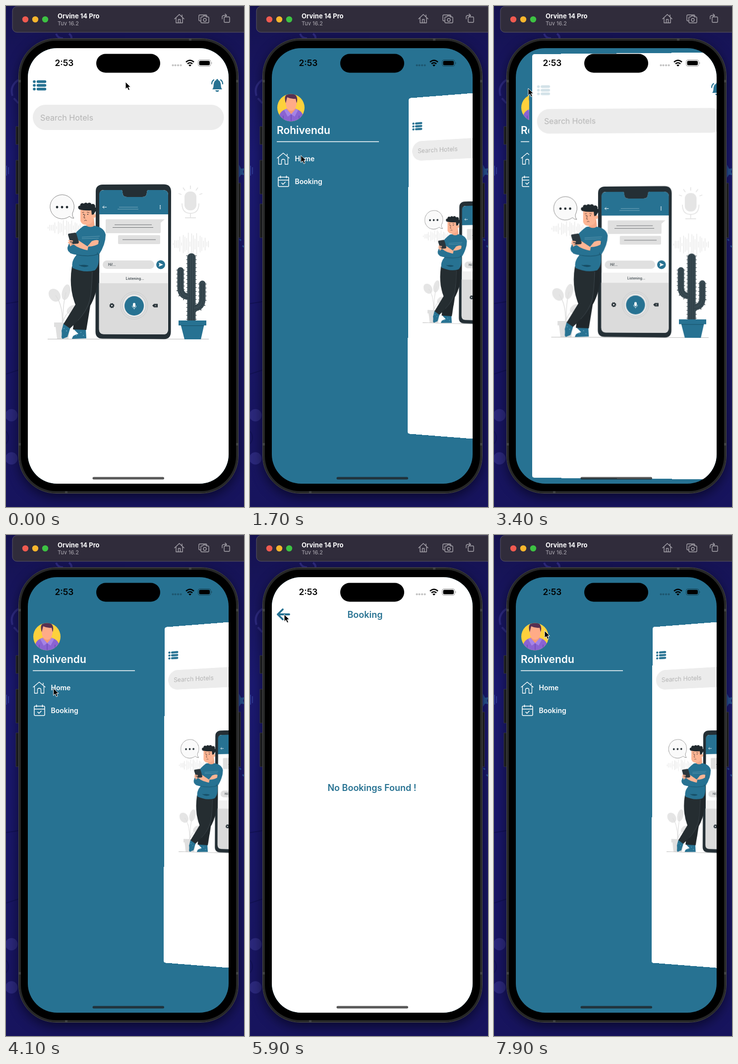
Animation, 480 px wide and 1010 px high, one loop 8000 ms. Source, as an HTML page:

```html
<!DOCTYPE html>
<html lang="en">
<head>
<meta charset="utf-8">
<title>Drawer menu</title>
<style>
html, body { margin: 0; width: 100%; height: 100%; overflow: hidden; background: #18155f; }
#stage { position: relative; width: 480px; height: 1010px; overflow: hidden; font-family: Inter, "Open Sans", sans-serif; }
#stage > svg { position: absolute; left: 0; top: 0; }
#screen { position: absolute; left: 44px; top: 85px; width: 405px; height: 878px; border-radius: 59px; overflow: hidden; background: #277292; }
#screen svg { position: absolute; left: 0; top: 0; display: block; }
#page { position: absolute; width: 405px; height: 878px; background: #fff; border-radius: 5px; overflow: hidden; transform-origin: 0 50%; }
#phone { position: absolute; left: 25px; top: 65px; width: 444px; height: 918px; box-sizing: border-box; border: 1.5px solid #4b4b4b; border-radius: 76px; background: #000; box-shadow: inset 0 0 0 4px #262727, 0 8px 22px rgba(0,0,10,.55); }
text { white-space: pre; }
</style>
</head>
<body>
<div id="stage">
  <svg width="480" height="1010">
    <defs><linearGradient id="night" x2="0" y2="1">
      <stop stop-color="#15124f"/><stop offset=".3" stop-color="#1b1970"/><stop offset="1" stop-color="#17145d"/>
    </linearGradient></defs>
    <rect width="480" height="1010" fill="url(#night)"/>
    <g fill="none" stroke="#35318a" stroke-width="4" opacity=".75">
      <path d="M25 149Q7 161 13 181M16 186l9 10M101 56q4 10 14 9M127 56q6 4 5 10"/>
      <path d="M0 857q10 13 0 26M0 600l25-4M0 742l25-8" stroke-width="2" stroke="#111050"/>
    </g>
    <g fill="#302d82" opacity=".8"><circle cx="11" cy="825" r="12.5"/><circle cx="11" cy="912" r="12.5"/></g>
    <path d="M1 322v20M5 325v14" stroke="#2d3790" stroke-width="2"/>
    <path d="M470 320l4 8 7-1-3 7 3 7-7-1-4 6z" fill="#285494"/>
    <path d="M471 470l3 3M477 483l3 3" stroke="#28509a" stroke-width="3"/>
    <g fill="#222324" stroke="#4a4a4a" stroke-width=".8">
      <path d="M20 243h6v36h-6zM20 311h6v68h-6zM20 399h6v68h-6zM467 357h6v110h-6z"/>
    </g>
    <rect x="13" y="1" width="480" height="52" rx="9" fill="#302c3b" stroke="#5b5663"/>
    <circle cx="39" cy="27" r="6.2" fill="#ef5a50"/><circle cx="59" cy="27" r="6.2" fill="#f8b62d"/><circle cx="79" cy="27" r="6.2" fill="#3dc243"/>
    <text x="104" y="25" font-size="13" font-weight="700" fill="#fff">Orvine 14 Pro</text>
    <text x="104" y="39" font-size="11" fill="#aeabb3">Tuv 16.2</text>
    <g fill="none" stroke="#a5a2aa" stroke-width="1.4" stroke-linejoin="round" stroke-linecap="round">
      <path d="M340 26l9.500-9 9.500 9M343 24v10h13V24M347.500 34v-7h4v7M355 18v4"/>
      <rect x="389" y="18" width="16" height="12" rx="2"/>
      <path d="M395 22h2l1-2h5l1 2h3q2 0 2 2v8q0 2-2 2h-12q-2 0-2-2v-8q0-2 2-2z" fill="#302c3b"/><circle cx="401" cy="28" r="3"/>
      <rect x="440" y="22" width="11" height="11" rx="1.500"/><path d="M436 26v-4q0-3 4-3h5M442 16l3 3-3 3"/>
    </g>
  </svg>

  <div id="phone"></div>
  <svg width="480" height="1010" fill="#515253">
    <path d="M25 149h5v5h-5zM25 881h5v5h-5zM464 149h5v5h-5zM464 881h5v5h-5zM369 66h5v4h-5zM119 978h5v4h-5z" opacity=".6"/>
  </svg>

  <div id="screen">
    <svg id="drawer" width="405" height="878" viewBox="44 85 405 878">
      <clipPath id="round"><circle cx="82.500" cy="205" r="27.500"/></clipPath>
      <circle cx="82.500" cy="205" r="27.500" fill="#fdd13c"/>
      <g clip-path="url(#round)">
        <path d="M57 235q0-24 16-27l10-3 10 3q16 3 16 27z" fill="#8a63d2"/>
        <path d="M67 235v-14M99 235v-14M83 217v18" stroke="#6f4bb8" stroke-width="1.500"/>
        <path d="M73 207l5-2h10l5 2-9 12z" fill="#f59a72"/>
        <path d="M72 190q0-12 11-12t11 12v7q-2 14-11 14t-11-14z" fill="#ffab87"/>
        <path d="M72 196q-5-18 6-18 9-5 15 3 4 5 1 15l-2-9q-9 1-17-3z" fill="#573052"/>
        <path d="M73 207l10 11-7 5-7-13zM93 207l-10 11 7 5 7-13z" fill="#a583e5"/>
      </g>
      <text x="54" y="258" font-size="21" font-weight="600" fill="#fff">Rohivendu</text>
      <path d="M54 273.500H260" stroke="#fff" stroke-width="1.300"/>
      <g fill="#fff" font-size="14" font-weight="600">
        <g id="homeItem">
          <path d="M54.500 307l12.500-10.500L79.500 307M57.500 305v14h6v-7q0-3 3.500-3t3.500 3v7h6v-14M75 298v4" fill="none" stroke="#fff" stroke-width="1.300" stroke-linejoin="round"/>
          <text x="90.500" y="312.500">Home</text>
        </g>
        <g id="bookingItem">
          <path d="M59 345h17q2 0 2 2v15q0 2-2 2H59q-2 0-2-2v-15q0-2 2-2zM57 351h21M61.500 342v5M73.500 342v5M63.500 356.500l3 3 5-5" fill="none" stroke="#fff" stroke-width="1.500"/>
          <text x="90.500" y="358.500">Booking</text>
        </g>
      </g>
    </svg>

    <div id="page">
      <svg id="home" width="405" height="878" viewBox="44 85 405 878">
        <g id="menuIcon" stroke="#277292" stroke-width="5.600" stroke-linecap="round">
          <path d="M57 152.500h.1M64.500 152.500h14M57 160h.1M64.500 160h14M57 167.500h.1M64.500 167.500h14"/>
        </g>
        <path d="M416 168q2-2 2.500-6 0-11 5.500-12.500 0-2.500 2-2.500t2 2.500q5.500 1.500 5.500 12.500.5 4 2.500 6zM422 170h8q-1 3-4 3t-4-3z" fill="#277292"/>
        <path d="M419 149q-4 3-4 8M433 149q4 3 4 8" fill="none" stroke="#277292" stroke-width="2.200" stroke-linecap="round"/>
        <rect x="54" y="199" width="385.500" height="51" rx="25.500" fill="#ececec"/>
        <text x="69" y="230.500" font-size="16.200" fill="#b4b4b4">Search Hotels</text>

        <path id="waves" stroke="#dedede" stroke-width="1"/>
        <path d="M84 671.500H409" stroke="#a9a9a9" stroke-width=".8"/>
        <g fill="#e5e5e5">
          <rect x="360" y="374" width="24" height="38" rx="11"/>
          <path d="M355 398q0 20 17 20t17-20M372 418v9M361 427h22M372 362v7M357 366l4 6M387 366l-4 6M348 378l6 2M396 378l-6 2" fill="none" stroke="#e5e5e5" stroke-width="1.800"/>
          <ellipse cx="98" cy="583" rx="11" ry="14" transform="rotate(-35 98 583)"/>
          <ellipse cx="121" cy="577" rx="8" ry="16" transform="rotate(14 121 577)"/>
          <ellipse cx="132" cy="612" rx="7" ry="11" transform="rotate(50 132 612)"/>
          <path d="M113 642Q116 605 100 583M115 640Q114 604 121 577M115 636Q119 622 132 612" fill="none" stroke="#dedede" stroke-width="1.500"/>
          <path d="M97 638h35v9h-3l-3 24h-23l-3-24h-3z" fill="#dfdfdf"/>
        </g>
        <path d="M136 413a24.300 24.300 0 1 0-8 11q3 4 9 4-4-4-3-10z" fill="#fafafa" stroke="#555" stroke-width=".7"/>
        <path d="M103 405.500h.1M113 405.500h.1M123 405.500h.1" stroke="#222b30" stroke-width="4.800" stroke-linecap="round"/>

        <path d="M195 360l123-.500q15 0 15 15l-.500 282q0 15-14 15l-124-1q-14 0-14-14l.500-283q0-13 14-13.500z" fill="#242f35"/>
        <path d="M198 371h34q3 0 3 5 0 9 9 9h31q9 0 9-9 0-5 4-5h29q10 0 10 10v271q0 10-10 10l-120-.500q-9 0-9-10l.500-271q0-10 9.500-9.500z" fill="#fff"/>
        <path d="M198 371h34q3 0 3 5 0 9 9 9h31q9 0 9-9 0-5 4-5h29q10 0 10 10v39H188v-39q0-10 10-10z" fill="#277292"/>
        <path d="M203 405.500h-8l3-3m-3 3l3 3" fill="none" stroke="#fff" stroke-width="1"/>
        <path d="M228 405.500h38M225 409.500h42" stroke="#8bb5c6" stroke-width=".8"/>
        <path d="M311 402.500h.1M311 405.500h.1M311 408.500h.1" stroke="#fff" stroke-width="2" stroke-linecap="round"/>
        <path d="M203 430h117l-8 7v19q0 2-2 2H203q-2 0-2-2v-24q0-2 2-2z" fill="#e0e0e0"/>
        <rect x="226" y="462" width="85" height="18" rx="2" fill="#e0e0e0"/>
        <path d="M219 441h75M215 446.500h82M235 471h67" stroke="#606467" stroke-width=".9"/>
        <rect x="195" y="513" width="104" height="17" rx="8.500" fill="#e0e0e0"/>
        <circle cx="312" cy="521.500" r="9" fill="#277292"/>
        <path d="M308 517.500l9 4-9 4 1.500-4z" fill="#fff"/>
        <path d="M188 538h138.500v20H188z" fill="#f0f0f0"/>
        <g font-size="7" font-weight="500" fill="#242f35"><text x="206" y="524">Hi!...</text><text x="260" y="552" text-anchor="middle">Listening...</text></g>
        <path d="M187.500 558.500H326.500V652q0 10-10 10l-119-.500q-10 0-10-10z" fill="#dbdbdb"/>
        <g fill="none" stroke="#b5bcc0" stroke-width=".8"><circle cx="258.500" cy="604" r="23.500" fill="#e8e8e8"/><circle cx="258.500" cy="604" r="27.500" stroke="#c7c7c7"/></g>
        <circle cx="258.500" cy="604.500" r="19.500" fill="#277292"/>
        <rect x="256" y="598.500" width="5" height="8.500" rx="2.500" fill="#fff"/>
        <path d="M254.500 604q0 5 4 5t4-5M258.500 609v2.500" fill="none" stroke="#fff" stroke-width=".8"/>
        <circle cx="213.500" cy="604" r="3" fill="none" stroke="#242f35" stroke-width="2.400"/>
        <circle cx="213.500" cy="604" r="4.500" fill="none" stroke="#242f35" stroke-width="1.200" stroke-dasharray="1.770"/>
        <path d="M295 604l3.500-3.500h7.500v7h-7.500z" fill="#242f35"/><path d="M300 602.500l3 3m0-3l-3 3" stroke="#ddd" stroke-width=".8"/>

        <g id="man">
          <path d="M116 640l14 8-6 19-10 4-2-3q1-9 0-13z" fill="#277292"/>
          <path d="M136 651l25 1 1 18-29 1q1-8 13-10z" fill="#277292"/>
          <path d="M117 650h.1M122 655h.1M142 664h.1M151 658h.1M156 664h.1" stroke="#9fd0e2" stroke-width="1.500" stroke-linecap="round"/>
          <path d="M150 528l37-1q0 48-17 77l-8 49-27-1q4-34 10-56z" fill="#20272b"/>
          <path d="M133 525q-7 42 7 77l-24 39 13 9q39-35 41-57l6-65z" fill="#252d31"/>
          <path d="M174 536q-1 38-5 57-6 22-24 41" fill="none" stroke="#465057" stroke-width=".7"/>
          <path d="M162 433l15-6 2 19q-8 8-17 1z" fill="#f6a888"/>
          <path d="M150 411q12-6 25 0 2 18-1 24-4 7-14 6-8-1-10-8z" fill="#fdb594"/>
          <circle cx="177" cy="423" r="4" fill="#fdb594"/>
          <g fill="#20292e">
            <circle cx="149" cy="406" r="3.500"/><circle cx="154" cy="402" r="4.500"/><circle cx="161" cy="401" r="4.500"/><circle cx="168" cy="401" r="4.500"/><circle cx="175" cy="404" r="5"/><circle cx="178" cy="410" r="4.500"/>
            <path d="M147 410l5-6h22l7 9-4 7-4 1-1-9q-14 1-25-2z"/>
            <circle cx="156.500" cy="420" r="1"/><circle cx="165" cy="420" r="1"/>
          </g>
          <path d="M153.500 416.500l4-1M163 415.500l5 1M159 420l-2 7 3 .500M158 433q3-3 5 0" fill="none" stroke="#4a322c" stroke-width=".9"/>
          <path d="M153 446q4-4 9-3 9 5 16 0 20 3 23 18 0 20-14 41 2 22-8 31-21 6-45-5-3-15 10-28-21 0-20-13 8-25 29-41z" fill="#277292"/>
          <path d="M153 466l36-2M153 469l34-1" stroke="#6ba1b7" stroke-width=".8"/>
          <path d="M141 501q26 6 46-1M188 474q-3 10-4 26M147 522q12 5 18 1" fill="none" stroke="#164b62" stroke-width="1"/>
          <path d="M148 523q9 6 19 1-8-4-19-1z" fill="#174e66"/>
          <path d="M127 475q4-8 10-6l10 4 18 12 12 3-6 10q-19-7-33-8-11-3-11-15z" fill="#fdb594"/>
          <path d="M128 488q3-7 9-7 9 8 30 12l-2 7q-24 4-36-2z" fill="#277292"/>
          <path d="M164 485l9-11q10-4 14-1l-1 8q-7 4-16 5z" fill="#fdb594"/>
          <path d="M166 485q14 0 24-8l6 2q-8 17-16 21l-17-1z" fill="#277292"/>
          <path d="M126 459l13-2q2 0 3 2l5 17q0 2-2 3l-12 1q-2 0-3-2l-5-17z" fill="#2b363c"/>
          <path d="M127 473l7 1M126 477l7 1" stroke="#fdb594" stroke-width="2.500" stroke-linecap="round"/>
        </g>

        <g fill="none" stroke-linecap="round">
          <g id="spines" stroke="#27343b" stroke-linecap="butt" stroke-dasharray="1 7">
            <path d="M374 503V632" stroke-width="21"/><path d="M352 532V568Q352 585 368 587M396 560V590Q396 608 380 609" stroke-width="17"/>
          </g>
          <g stroke="#384951">
            <path d="M374 507V636" stroke-width="17"/><path d="M352 533V568Q352 585 368 586M396 560V590Q396 608 380 609" stroke-width="13"/>
          </g>
          <path d="M370 502V634M374 500V634M378 502V634M350 532V568Q351 586 368 589M354 532V566Q355 581 368 583M394 560V588Q394 604 380 606M398 560V592Q397 611 380 612" stroke="#26343b" stroke-width=".8"/>
        </g>
        <path d="M352 641h48l-7 31h-33z" fill="#277292"/><path d="M348 634h56v10h-56z" fill="#277292"/><path d="M353 644.500h46" stroke="#174f66" stroke-width="1"/>
      </svg>

      <svg id="booking" width="405" height="878" viewBox="44 85 405 878">
        <path id="backIcon" d="M79 160H56m10-10l-10 10 10 10" fill="none" stroke="#277292" stroke-width="3.800" stroke-linecap="round" stroke-linejoin="round"/>
        <g fill="#277292" font-size="18" font-weight="600" text-anchor="middle"><text x="232" y="166.500">Booking</text><text x="246" y="516">No Bookings Found !</text></g>
      </svg>
    </div>
  </div>

  <svg width="480" height="1010">
    <text x="98.500" y="121" font-size="17.300" font-weight="600">2:53</text>
    <rect x="182" y="96.500" width="129" height="38" rx="19"/>
    <path d="M336.500 119.500h.1M341.500 119.500h.1M347 119.500h.1M352.500 119.500h.1" stroke="rgba(0,0,0,.24)" stroke-width="4.200" stroke-linecap="round"/>
    <path d="M363 113q8-7 16 0M366 116.500q5-4 10 0" fill="none" stroke="#000" stroke-width="2.500"/><path d="M368 119q3-2 6 0l-3 3z"/>
    <rect x="387.500" y="108.500" width="25.500" height="13" rx="4" fill="none" stroke="rgba(0,0,0,.4)"/>
    <rect x="389.500" y="110.500" width="21.500" height="9" rx="2.500"/><path d="M414.500 113q2 2 0 4z" fill="rgba(0,0,0,.45)"/>
    <rect x="174.500" y="949.500" width="144.500" height="5" rx="2.500" fill="rgba(30,30,30,.74)"/>
    <path id="cursor" d="M0 0V14.500L3.400 11.400 5.800 17 8.500 15.900 6.100 10.400H10.500Z" fill="#000" stroke="#fff" stroke-width="1"/>
  </svg>
</div>

<script>
const $ = id => document.getElementById(id);
const clamp = x => Math.min(1, Math.max(0, x));
const LOOP = 8000, STEP = 100, SLIDE = 450, OPEN_X = 275;

// [time, drawer open after the tap]
const taps = [[668, 1], [2058, 0], [3299, 1], [4632, 0], [7460, 1]];
const BACK_TAP = 6100, BACK_DONE = 6200;
const cursorPath = [
  [0, 241, 153], [550, 68, 160], [750, 68, 160], [1000, 75, 149.500], [1750, 103, 303],
  [2400, 102, 303], [3100, 69, 166], [3500, 69, 166], [4400, 105, 359], [5050, 105, 359],
  [5800, 69, 160], [7550, 69, 160], [7900, 102, 193], [8000, 102, 193]
];

function soundWave(x0, x1, y, reach) {
  let d = '';
  for (let x = x0, i = 0; x < x1; x += 3.4, i++) {
    const h = 2 + reach * Math.abs(Math.sin(i * 1.9)) * Math.sin(Math.PI * (x - x0 + 4) / (x1 - x0 + 8));
    d += `M${x} ${y - h}V${y + h}`;
  }
  return d;
}
$('waves').setAttribute('d', soundWave(85, 156, 447, 14) + soundWave(337, 411, 480, 22));

function openness(t) {
  const tap = taps.filter(([start]) => start <= t).pop();
  if (!tap) return 0;
  const eased = (1 - Math.cos(Math.PI * clamp((t - tap[0]) / SLIDE))) / 2;
  return tap[1] ? eased : 1 - eased;
}

// Pressed items dim at once and then recover.
function pressAlpha(t, ...starts) {
  return Math.min(...starts.map(s => t < s ? 1 : 0.2 + 0.8 * clamp((t - s - 100) / 250) ** 2));
}

function cursorAt(t) {
  const i = cursorPath.findIndex(k => k[0] > t);
  const [t0, x0, y0] = cursorPath[i - 1], [t1, x1, y1] = cursorPath[i];
  const p = (t - t0) / (t1 - t0), e = p * p * (3 - 2 * p);
  return [x0 + (x1 - x0) * e, y0 + (y1 - y0) * e];
}

// The page shrinks, turns away and leans slightly as its left edge moves to x.
function pageMatrix(x) {
  const scale = 1 - 8.35e-4 * x, depth = 6.2e-7 * x;
  const turn = 1 - 7.5e-5 * x ** 1.15, lean = -1.2e-5 * x * scale;
  return `matrix3d(${[
    scale * turn - depth * x, 0, 0, -depth,
    lean, scale, 0, 0,
    0, 0, 1, 0,
    x, 0, 0, 1
  ].map(v => v.toFixed(9))})`;
}

function draw(now) {
  const t = Math.floor(now % LOOP / STEP) * STEP;
  const x = OPEN_X * openness(t);
  $('page').style.transform = pageMatrix(x);
  $('drawer').style.clipPath = `inset(0 ${405 - 0.82 * x}px 0 0)`;

  const onBooking = t >= taps[3][0] && t < BACK_DONE;
  $('home').style.display = onBooking ? 'none' : 'block';
  $('booking').style.display = onBooking ? 'block' : 'none';

  $('menuIcon').style.opacity = pressAlpha(t, taps[0][0], taps[2][0], taps[4][0]);
  $('homeItem').style.opacity = pressAlpha(t, taps[1][0]);
  $('bookingItem').style.opacity = pressAlpha(t, taps[3][0]);
  $('backIcon').style.opacity = pressAlpha(t, BACK_TAP);

  $('cursor').setAttribute('transform', `translate(${cursorAt(t)})`);
}

const start = performance.now();
function tick() {
  draw(performance.now() - start);
  requestAnimationFrame(tick);
}
tick();
</script>
</body>
</html>
```
